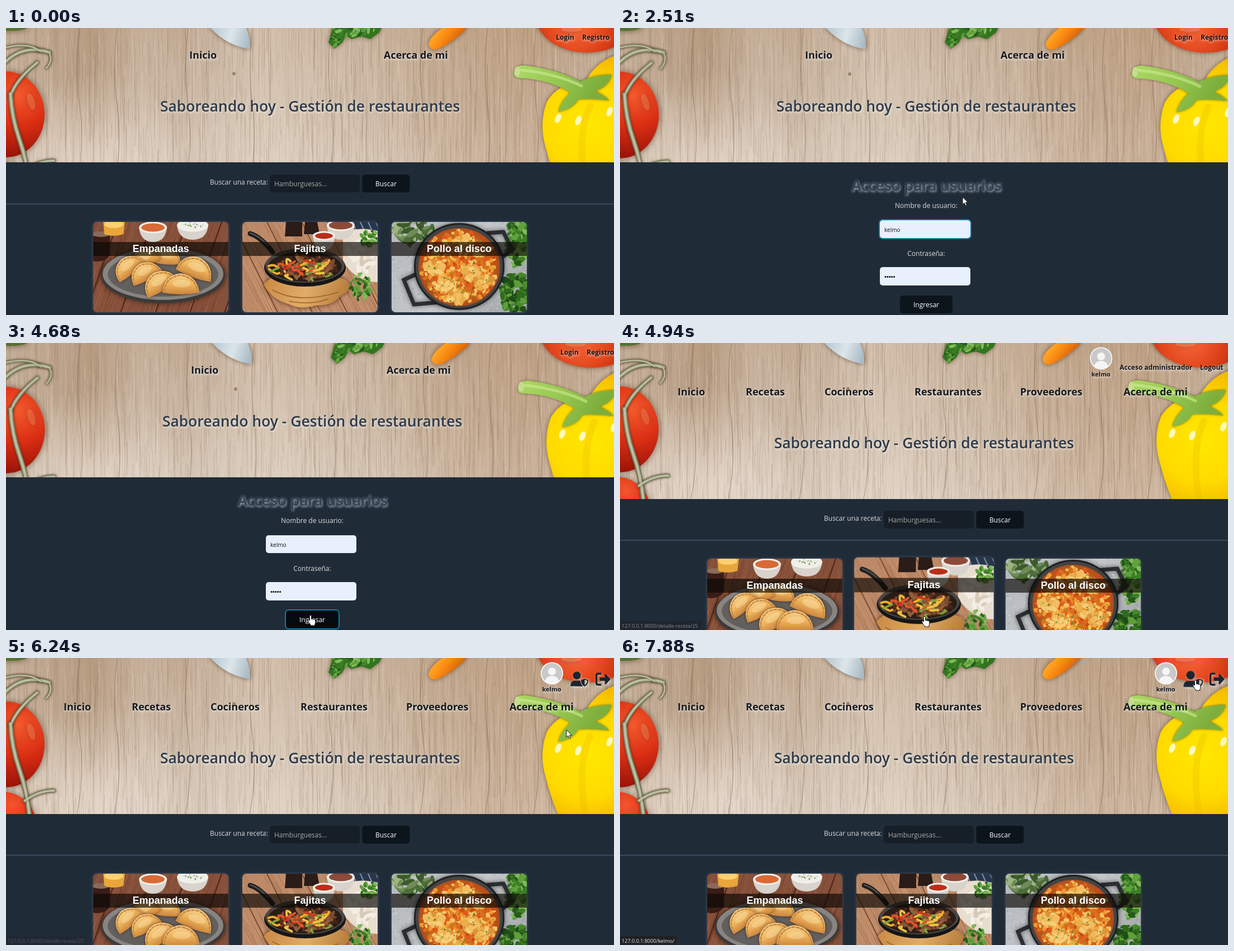
An HTML page with a canvas that plays this animation: 1088 by 515 pixels, repeating every 8000 ms.

```html
<!DOCTYPE html>
<html lang="es">
<head>
<meta charset="utf-8">
<title>Recetas</title>
<style>
html, body { margin: 0; width: 100%; height: 100%; overflow: hidden; background: #202b38; }
#stage { position: relative; width: 1088px; height: 515px; overflow: hidden; background: #202b38; }
#stage > * { position: absolute; left: 0; top: 0; }
#stage *, #ui * { animation-duration: 8s; animation-iteration-count: infinite; animation-timing-function: linear; }
#head { width: 1088px; overflow: hidden; animation-name: head; }
#wood { display: block; transform-origin: 0 0; animation-name: widen; }
#cards, #search { animation-name: home; }
#cards { --dy: 39px; }
#search { --dy: 38px; }
.card { position: absolute; top: 348px; width: 242px; height: 162px; border-radius: 7px; overflow: hidden; box-shadow: 0 0 5px #7f95ab66; }
.card canvas { display: block; }
.card b { position: absolute; left: 0; top: 36px; width: 100%; text-align: center; background: #0b0806a8; color: #fff;
  font: bold 18px/25px 'Liberation Sans', Arial, sans-serif; }
#mid { animation-name: zoom; }

text { font: 12px 'Open Sans', 'Noto Sans', sans-serif; fill: #dbdbdb; }
.c { text-anchor: middle; }
.dark text { fill: #15191f; font-weight: 700; filter: drop-shadow(1px 2px 2px #fffa); }
.dark .nav { font-size: 18px; }
.dark .h1 { font-size: 26.5px; font-weight: 600; fill: #2f3b49; text-anchor: middle; }
.dark .tiny { font-size: 11px; }
.h2 { font-size: 26.4px; font-weight: 600; fill: #30404f; text-anchor: middle; filter: drop-shadow(1px 2px 2px #b9c6d2); }
.field { font-size: 10px; fill: #111; }
#out { animation-name: out; }
#login { animation-name: login; }
#in { animation-name: in; }
#out, #login, #in, #head, #wood, #cards, #search, #links, #icons, #avatar, #arrow, #hand, #press { animation-timing-function: step-end !important; }
#links { animation-name: links; }
#icons { animation-name: icons; }
#avatar { animation-name: avatar; }
#shield { animation-name: grow; transform-box: fill-box; transform-origin: center; }
#press { animation-name: press; }
#send { animation-name: send; }
#ringA { animation-name: ringA; }
#ringB { animation-name: ringB; }
.status rect { fill: #202124; }
.status text { font-size: 9.1px; fill: #e4e5e8; }
#st1 { animation-name: st1; }
#st2 { animation-name: st2; }
#st3 { animation-name: st3; }
#ask { animation-name: ask; }
#ask .p { font-size: 9px; fill: #a4a7ac; }
#ask .btn { font-size: 9.2px; font-weight: 600; text-anchor: middle; }
#cursor { animation-name: move; }
#arrow { animation-name: arrow; }
#hand { animation-name: hand; }

@keyframes head { 0% { height: 241px } 59%, 100% { height: 280px } }
@keyframes widen { 0% { transform: none } 26.2% { transform: scale(1.0074) } 59%, 100% { transform: none } }
@keyframes home {
  0% { visibility: visible; transform: none }
  26.2% { visibility: hidden; transform: none }
  59%, 100% { visibility: visible; transform: translateY(var(--dy)) }
}
@keyframes out { 0% { visibility: visible } 26.2%, 100% { visibility: hidden } }
@keyframes login { 0% { visibility: hidden } 26.2% { visibility: visible } 59%, 100% { visibility: hidden } }
@keyframes in { 0% { visibility: hidden } 59%, 100% { visibility: visible } }
@keyframes links { 0% { opacity: 1 } 63.5%, 100% { opacity: 0 } }
@keyframes icons { 0% { opacity: 0 } 63.5%, 100% { opacity: 1 } }
@keyframes avatar { 0% { transform: translate(-116px) } 63.5%, 100% { transform: none } }
@keyframes grow { 0%, 94.5% { transform: none } 97%, 100% { transform: scale(1.1) } }
@keyframes zoom { 0%, 59.5% { transform: none } 63%, 72.8% { transform: scale(1.05) } 75.5%, 100% { transform: none } }
@keyframes press { 0% { transform: none } 48.4% { transform: translateY(2px) } 50%, 100% { transform: none } }
@keyframes send { 0%, 44% { fill: #0c151c } 45%, 100% { fill: #040a0f } }
@keyframes ringA { 0%, 48.4% { opacity: 1 } 49.4%, 100% { opacity: 0 } }
@keyframes ringB { 0%, 48.4% { opacity: 0 } 49.4%, 100% { opacity: 1 } }
@keyframes st1 { 0%, 18.6% { opacity: 0 } 20.6%, 26.2% { opacity: 1 } 28%, 100% { opacity: 0 } }
@keyframes st2 { 0%, 60.75% { opacity: 0 } 62.75%, 76.4% { opacity: 1 } 78.5%, 100% { opacity: 0 } }
@keyframes st3 { 0%, 95.2% { opacity: 0 } 97.2%, 100% { opacity: 1 } }
@keyframes ask { 0%, 66.2% { opacity: 0 } 68.1%, 72.5% { opacity: 1 } 74.2%, 100% { opacity: 0 } }
@keyframes arrow { 0% { opacity: 0 } 6.63% { opacity: 1 } 18% { opacity: 0 } 26.3% { opacity: 1 } 44% { opacity: 0 } 69% { opacity: 1 } 94%, 100% { opacity: 0 } }
@keyframes hand { 0% { opacity: 0 } 18% { opacity: 1 } 26.3% { opacity: 0 } 44% { opacity: 1 } 69% { opacity: 0 } 94%, 100% { opacity: 1 } }
@keyframes move {
  0%, 6.6% { transform: translate(1058px, 479px) }
  10% { transform: translate(1010px, 270px) }
  13% { transform: translate(982px, 90px) }
  15.4%, 17.9% { transform: translate(1000px, 30px) }
  19%, 26.5% { transform: translate(1006px, 18px) }
  31.4%, 33.9% { transform: translate(612px, 304px) }
  38% { transform: translate(560px, 385px) }
  43.2%, 44% { transform: translate(545px, 477px) }
  45%, 57.5% { transform: translate(545px, 488px) }
  61.7%, 66.1% { transform: translate(545px, 491px) }
  67.8% { transform: translate(697px, 430px) }
  70.5%, 72.7% { transform: translate(692px, 228px) }
  75.9% { transform: translate(990px, 150px) }
  80.5%, 81.9% { transform: translate(1018px, 104px) }
  85.5%, 86.5% { transform: translate(996px, 92px) }
  88.2%, 90.8% { transform: translate(988px, 84px) }
  95.5%, 100% { transform: translate(1030px, 40px) }
}
</style>
</head>
<body>
<div id="stage">
  <div id="head"><canvas id="wood" width="1088" height="280"></canvas></div>
  <div id="cards">
    <div class="card" style="left:156px"><canvas id="pies" width="242" height="162"></canvas><b>Empanadas</b></div>
    <div class="card" style="left:423px" id="mid"><canvas id="pan" width="242" height="162"></canvas><b>Fajitas</b></div>
    <div class="card" style="left:690px"><canvas id="stew" width="242" height="162"></canvas><b>Pollo al disco</b></div>
  </div>
  <svg id="ui" width="1088" height="515" viewBox="0 0 1088 515">
    <g id="search">
      <text x="365" y="281">Buscar una receta:</text>
      <rect x="472" y="263" width="161" height="32" rx="5" fill="#161f27"/>
      <text x="480" y="284" style="fill:#a9a9a9">Hamburguesas...</text>
      <rect x="637.5" y="263" width="85" height="32" rx="5" fill="#0c151c"/>
      <text x="680" y="284" class="c" style="fill:#fff">Buscar</text>
      <path d="M0 316H1088" stroke="#526980"/>
    </g>

    <g id="out" class="dark">
      <text x="984" y="21">Login</text><text x="1031" y="21">Registro</text>
      <text class="nav" x="328" y="55">Inicio</text><text class="nav" x="676" y="55">Acerca de mi</text>
      <text class="h1" x="544" y="150">Saboreando hoy - Gestión de restaurantes</text>
    </g>

    <g id="login">
      <g class="dark">
        <text x="992" y="21">Login</text><text x="1039" y="21">Registro</text>
        <text class="nav" x="331" y="55">Inicio</text><text class="nav" x="681" y="55">Acerca de mi</text>
        <text class="h1" x="548" y="150">Saboreando hoy - Gestión de restaurantes</text>
      </g>
      <text class="h2" x="548.5" y="292">Acceso para usuarios</text>
      <text class="c" x="548" y="323">Nombre de usuario:</text>
      <rect id="ringA" x="464" y="344" width="164" height="34" rx="6" fill="none" stroke="#0f7d9e" stroke-width="2"/>
      <rect x="465" y="345" width="162" height="32" rx="5" fill="#e8f0fe"/>
      <text class="field" x="473" y="366">kelmo</text>
      <text class="c" x="548" y="409">Contraseña:</text>
      <rect x="465" y="429" width="162" height="33" rx="5" fill="#e8f0fe"/>
      <path d="M475 446.5h17" stroke="#111" stroke-width="3.2" stroke-linecap="round" stroke-dasharray="0 3.9"/>
      <g id="press">
        <rect id="ringB" x="500" y="479" width="96" height="34" rx="6" fill="none" stroke="#0f7d9e" stroke-width="2"/>
        <rect id="send" x="501" y="480" width="94" height="32" rx="5"/>
        <text class="c" x="548" y="501" style="fill:#fff">Ingresar</text>
      </g>
    </g>

    <g id="in" class="dark">
      <g id="avatar">
        <clipPath id="disc"><circle cx="977" cy="27.5" r="19"/></clipPath>
        <circle cx="977" cy="27.5" r="20" fill="#fff"/>
        <circle cx="977" cy="27.5" r="18.5" fill="#c9c9c9"/>
        <g fill="#f5f5f5" clip-path="url(#disc)"><circle cx="977" cy="24" r="7"/><ellipse cx="977" cy="41" rx="12" ry="9"/></g>
        <text class="tiny c" x="976.5" y="60">kelmo</text>
      </g>
      <g id="links"><text x="894" y="48">Acceso administrador</text><text x="1038" y="48">Logout</text></g>
      <g id="icons" fill="#1b2530" style="filter:drop-shadow(1px 2px 2px #fff8)">
        <g id="shield">
          <circle cx="1021.5" cy="31.5" r="7"/>
          <path d="M1010 50.5q0-10 9-10h5q3 0 4.500 1q0 6 4 9.500z"/>
          <path d="M1035.500 36.500l7 2.600q.4 9-7 12.400q-7.400-3.400-7-12.400z" stroke="#d9c3ac"/>
          <path d="M1035.500 39v9.500q4.500-2.500 4.600-7.700z" fill="#d9c3ac"/>
        </g>
        <path d="M1064 28h-4q-3.500 0-3.500 3.500v13q0 3.500 3.500 3.500h4" fill="none" stroke="#1b2530" stroke-width="3.4" stroke-linecap="round"/>
        <path d="M1063 35h8.500v-5.500q.8-1.500 2-.5l7.500 8q.8 1 0 2l-7.500 8q-1.200 1-2-.5v-5.500h-8.500q-1.500-3 0-6z"/>
      </g>
      <text class="nav" x="103" y="94">Inicio</text><text class="nav" x="225" y="94">Recetas</text>
      <text class="nav" x="366" y="94">Cocineros</text><text class="nav" x="527" y="94">Restaurantes</text>
      <text class="nav" x="716" y="94">Proveedores</text><text class="nav" x="901" y="94">Acerca de mi</text>
      <text class="h1" x="544" y="189">Saboreando hoy - Gestión de restaurantes</text>
    </g>

    <g id="ask">
      <rect x="366" y="-8" width="364" height="263" rx="5" fill="#2b2c2f" style="filter:drop-shadow(0 1px 3px #0009)"/>
      <g fill="none" stroke="#4a4c50" stroke-width="1.5">
        <rect x="458" y="5" width="55" height="74" rx="5"/><rect x="473" y="0" width="26" height="10" rx="3"/>
        <rect x="494" y="35" width="54" height="20" rx="2"/><path d="M513 79h27v-24"/>
        <path d="M367 50q12-9 20 1t18 8t22 7t15-3M560 68q20-14 40-3t45-5" stroke-width="4"/>
      </g>
      <path d="M697 46a7 7 0 0 1 14 0z" fill="#55575b"/>
      <path d="M486 27l19 30h-38z" fill="#e98a7d" stroke="#e98a7d" stroke-width="2" stroke-linejoin="round"/>
      <path d="M486 38v9M486 51v2.500" stroke="#2b2c2f" stroke-width="2.6"/>
      <text x="505" y="55" style="font-size:18px;font-weight:700;fill:#8ab4f8">***</text>
      <path d="M541.500 39v11" stroke="#8ab4f8" stroke-width="1.5"/>
      <text x="402" y="47" style="font-size:27px;fill:#77797d">*</text>
      <text x="380" y="113" style="font-size:11.2px;fill:#e3e4e7">Comprobar las contraseñas guardadas</text>
      <text class="p" x="380" y="142">La contraseña que acabas de usar se ha visto expuesta en una brecha de</text>
      <text class="p" x="380" y="158">seguridad de datos. Para proteger tus cuentas, el gestor de contraseñas de</text>
      <text class="p" x="380" y="174">Velnor te recomienda que compruebes las contraseñas que tengas</text>
      <text class="p" x="380" y="190">guardadas.</text>
      <g fill="none" stroke="#a4a7ac" stroke-width="1.2"><circle cx="388.5" cy="229" r="5.4"/><path d="M388.500 228v4M388.500 225.500v1.300"/></g>
      <rect x="525.5" y="216.5" width="131" height="25" rx="3" fill="#8ab4f8" stroke="#6796e4" stroke-width="2"/>
      <rect x="527.5" y="218.5" width="127" height="21" rx="2" fill="none" stroke="#2b2c2f"/>
      <text class="btn" x="591" y="232" style="fill:#24324a">Comprobar contraseñas</text>
      <rect x="664.5" y="216.5" width="53" height="25" rx="3" fill="none" stroke="#3f4145"/>
      <text class="btn" x="690" y="232" style="fill:#8ab4f8">Cerrar</text>
    </g>

    <g class="status">
      <g id="st1"><rect y="499" width="97" height="16"/><text x="3" y="511">127.0.0.1:8000/login/</text></g>
      <g id="st2"><rect y="499" width="145" height="16"/><text x="3" y="511">127.0.0.1:8000/detalle-receta/25</text></g>
      <g id="st3"><rect y="499" width="102" height="16"/><text x="3" y="511">127.0.0.1:8000/kelmo/</text></g>
    </g>

    <g id="cursor" fill="#fff" stroke="#111" stroke-linejoin="round">
      <path id="arrow" d="M0 0V13.500L3.200 10.600L5.500 15.600L7.700 14.600L5.500 9.800H9.700Z"/>
      <path id="hand" d="M-1.700 9.500V1.400a1.600 1.600 0 0 1 3.200 0V7a1.500 1.500 0 0 1 2.700.4a1.400 1.400 0 0 1 2.400.5a1.300 1.300 0 0 1 2.100 1v4.200q0 2-1.200 3.400v1.700h-7.500v-1.500q-2-1.800-3.600-5.200t-1.800-3.100q1-1.400 3.700.1z"/>
    </g>
  </svg>
</div>
<script>
let g, seed = 7;
const rnd = (a = 0, b = 1) => {
  seed = (seed * 16807) % 2147483647;
  return a + (b - a) * seed / 2147483647;
};
const pick = list => list[Math.floor(rnd(0, list.length))];
const paint = (id, draw) => { g = document.getElementById(id).getContext('2d'); draw(); };

function oval(x, y, rx, ry, fill, rot = 0) {
  g.beginPath();
  g.ellipse(x, y, rx, ry, rot, 0, 7);
  g.fillStyle = fill;
  g.fill();
}
function shape(d, fill) {
  g.fillStyle = fill;
  g.fill(new Path2D(d));
}
function line(d, color, width) {
  g.strokeStyle = color;
  g.lineWidth = width;
  g.lineCap = 'round';
  g.stroke(new Path2D(d));
}
function stops(grad, colors) {
  colors.forEach((c, i) => grad.addColorStop(i / (colors.length - 1), c));
  return grad;
}
const glow = (x, y, r, ...colors) => stops(g.createRadialGradient(x, y, 0, x, y, r), colors);
const fade = (x0, y0, x1, y1, ...colors) => stops(g.createLinearGradient(x0, y0, x1, y1), colors);
function shade(blur, color = '#3a200c99') {
  g.shadowBlur = blur;
  g.shadowColor = color;
}
// Random ovals inside an ellipse: leaves, chunks of food
function bits(n, x, y, rx, ry, size, flat, colors) {
  for (let i = 0; i < n; i++) {
    const a = rnd(0, 6.28), r = Math.sqrt(rnd()), s = rnd(.5, 1) * size;
    oval(x + rx * r * Math.cos(a), y + ry * r * Math.sin(a), s, s * flat, pick(colors), rnd(0, 3));
  }
}
function grain(n, w, h, tilt, colors) {
  for (let i = 0; i < n; i++) {
    const x = rnd(-20, w), y = rnd(-40, h), len = rnd(20, 130), k = rnd(-3, 3);
    line(`M${x} ${y}q${k + tilt * len / 2} ${len / 2} ${tilt * len} ${len}`, pick(colors), rnd(.4, 1.4));
  }
}
const greens = ['#2f6a1d', '#47882a', '#1f4d18', '#5f9e3a'];
const fresh = ['#3d7f26', '#60a23c', '#27591c', '#84b95a'];

paint('wood', () => {
  g.fillStyle = fade(0, 0, 0, 280, '#c2ab94', '#cab7a3', '#d8c9ba');
  g.fillRect(0, 0, 1088, 280);
  g.fillStyle = fade(0, 0, 1088, 0, '#9d785500', '#9d785555', '#fff0', '#f6ece04d', '#f6ece020', '#b78d6633', '#b78d6655', '#b78d6600');
  g.fillRect(0, 0, 1088, 280);
  g.fillStyle = glow(150, 270, 190, '#f4ebe2aa', '#f4ebe200');
  g.fillRect(0, 0, 400, 280);
  grain(2600, 1088, 280, 0, ['#86674a28', '#7352372c', '#f4eae028', '#fff6ec2c', '#8d6f5330']);
  for (const x of [128, 195, 322, 437, 578, 742, 858, 945]) {
    line(`M${x + 4} 0q-9 70 0 140t-5 140`, '#6f4d3266', 1.2);
  }
  oval(408, 82, 3, 3, '#7a5a3c99');

  shade(12);
  oval(8, -3, 32, 8, '#55702f');
  oval(0, 155, 69, 77, glow(22, 120, 110, '#f25a2c', '#dc2f14', '#9c1408'));
  oval(-6, 306, 62, 66, glow(10, 265, 80, '#f4562d', '#de3218', '#b01a0c'));
  oval(45, 132, 6, 15, '#ff9a6a55', -.3);
  shade(4);
  for (const [color, w] of [['#878c6c', 9], ['#b9bea0', 5]]) {
    line('M-4 64Q30 28 78 44', color, w * .9);
    line('M78 46Q84 60 72 72', color, w * .5);
    line('M-4 36Q40 24 62 42', color, w * .5);
    line('M8 122Q18 92 56 62', color, w * .8);
    line('M8 118Q10 160 24 200T42 284', color, w);
    line('M34 256Q58 238 86 238', color, w * .8);
  }
  shade(9);
  shape('M362-4Q394 32 437 38Q438 18 428-4Z', fade(370, 0, 437, 20, '#b8c8d2', '#dce6ea', '#a9bac4'));
  shape('M586-4L577 26L588 37L602 26L609 13L618 20L636 15L652 20L668 8L674-4Z', '#32751f');
  shade(0);
  bits(60, 622, -2, 40, 16, 7, .4, fresh);
  bits(15, 591, 22, 9, 11, 5, .5, fresh);
  shade(9);
  shape('M786-4Q757 16 756 30Q760 42 774 37Q806 22 828-4Z', fade(765, 5, 800, 32, '#ffb02e', '#fb8b12', '#d9640a'));
  oval(1040, -22, 92, 66, glow(1020, -5, 100, '#f7683a', '#e2471d', '#bc2608'));
  oval(1012, 2, 18, 5, '#ff9d6d66');
  shape('M1100 46Q1055 58 1035 100Q990 96 968 132Q953 172 966 215Q976 255 992 290H1100Z',
    glow(1040, 175, 150, '#ffe800', '#ffdb00', '#efaa00'));
  shade(0);
  line('M1045 140Q1020 195 1038 290', '#e8ae0040', 12);
  for (const [x, y] of [[988, 162], [1024, 166], [1080, 150]]) oval(x, y, 5, 9, '#fffbd8dd', .4);
  shade(4);
  shape('M909 80Q911 66 928 67Q985 74 1028 96Q1050 84 1084 84Q1078 106 1054 113Q1070 120 1080 130Q1045 126 1024 128Q1014 146 988 150Q994 130 1010 116Q970 92 922 90Q908 90 909 80Z',
    fade(930, 70, 1040, 140, '#a9d563', '#95c650', '#7dae3c'));
  shade(0);
  line('M920 75Q985 82 1030 104', '#cfeb9499', 5);
  oval(915, 78, 5, 9, '#c6dc92');
});

function planks(base, seam, tilt, tones) {
  g.fillStyle = base;
  g.fillRect(0, 0, 242, 162);
  grain(320, 242, 162, tilt, tones);
  for (let x = -80; x < 300; x += 62) line(`M${x} 0l${tilt * 162} 162`, seam, 2);
}
function bowl(x, y, rx, fill) {
  shape(`M${x - rx} ${y}Q${x - rx + 3} ${y + 26} ${x} ${y + 26}T${x + rx} ${y}Z`, '#d8d3cc');
  oval(x, y, rx, rx * .42, '#f3efea');
  oval(x, y, rx - 4, rx * .42 - 3, fill);
}
function empanada(x, y, size, rot) {
  g.save();
  g.translate(x, y);
  g.rotate(rot);
  g.scale(size, size);
  shade(5, '#2008');
  shape('M-28 11Q-26-16 0-19Q26-16 30 11Q0 17-28 11Z', fade(0, -19, 0, 15, '#f8d592', '#edb45f', '#c98238'));
  shade(0);
  g.setLineDash([4, 3]);
  line('M-25 9Q-23-13 0-16Q23-13 27 9', '#c98a41', 2.5);
  g.setLineDash([]);
  oval(2, -3, 14, 6, '#fde6b066');
  g.restore();
}

paint('pies', () => {
  planks('#86503a', '#4a2416', -.35, ['#5f311f66', '#b3765666', '#6d392466', '#9a604688']);
  shape('M0 22H30V60Q20 74 0 70Z', '#3a1d18');
  oval(14, 22, 16, 5, '#8b6a5a');
  shape('M18 0H57L54 22Q36 28 20 22Z', '#e9a63a');
  oval(37, 4, 17, 7, '#ffd070');
  bowl(107, 10, 25, '#d96a35');
  bowl(178, 6, 28, '#efeee9');
  bits(18, 178, 5, 18, 5, 2, .6, ['#7c9a5a', '#c9c9b8']);
  shade(10, '#1009');
  oval(125, 96, 111, 50, '#3b3a39');
  shade(0);
  oval(125, 93, 108, 47, '#878481');
  oval(125, 94, 99, 40, '#625f5c');
  empanada(128, 62, 1, .1);
  empanada(92, 66, .95, -.4);
  empanada(62, 82, 1, -.7);
  empanada(92, 92, 1, -.5);
  empanada(182, 84, 1.15, .35);
  empanada(118, 110, 1.1, -.55);
  empanada(156, 114, 1.15, 0);
});

paint('pan', () => {
  planks('#bd8a68', '#7a4d34', .5, ['#8a573866', '#e0b08a77', '#9b664466', '#d09c7877']);
  shape('M150 0H242V24L205 14Z', '#28364d');
  for (let x = 155; x < 242; x += 14) line(`M${x} 0l8 18`, '#8192a8', 2);
  shape('M180 24Q200 6 242 16V108Q205 108 180 72Z', '#e8ded0');
  bits(18, 214, 54, 26, 34, 13, .4, ['#f5eee4', '#d9cab8']);
  shape('M78 0H107V26H76ZM112 0H134L138 22H110Z', '#2a1c18');
  bowl(176, 6, 25, '#8d4a37');
  bowl(146, 25, 20, '#b92f18');
  shade(8, '#200a');
  shape('M38 112Q58 88 112 92T186 104Q200 122 176 132Q164 150 132 150Q104 158 84 148Q50 138 38 112Z',
    fade(40, 95, 190, 150, '#c98943', '#e0ac68', '#b27636'));
  shade(0);
  line('M54 122Q100 148 172 126M84 142Q124 150 154 138', '#9c622a', 1.5);
  line('M14 21Q32 26 54 54', '#1c1c1d', 9);
  line('M14 20Q30 25 46 42', '#55524f', 2.5);
  oval(112, 82, 73, 34, '#161616');
  oval(112, 78, 71, 31, '#4a4745');
  oval(112, 80, 66, 27, '#2a1d16');
  bits(95, 112, 81, 54, 20, 9, .4, ['#7d4a30', '#5c301d', '#96603d', '#43241a']);
  for (let i = 0; i < 42; i++) {
    const a = rnd(0, 6.28), r = rnd(.2, 1);
    line(`M${112 + 55 * r * Math.cos(a)} ${81 + 20 * r * Math.sin(a)}q${rnd(-14, 14)} ${rnd(-10, 10)} ${rnd(-20, 20)} ${rnd(-8, 8)}`,
      pick(['#e8532a', '#f3ad2c', '#ecc443', '#7fa53a', '#8a5436', '#d0381f']), 4);
  }
  bits(32, 228, 30, 16, 14, 6, .6, fresh);
  bits(50, 212, 116, 19, 24, 6, .5, fresh);
});

paint('stew', () => {
  g.fillStyle = fade(0, 0, 242, 162, '#b4b8bc', '#c5c8cb', '#9da2a4');
  g.fillRect(0, 0, 242, 162);
  bits(500, 121, 81, 150, 100, 2, .7, ['#898e9266', '#e2e4e677']);
  bits(60, 28, 14, 44, 24, 14, .4, ['#6f8b56', '#4d6e3a', '#9db482', '#3d5a2c']);
  bits(130, 226, 34, 20, 44, 9, .55, fresh);
  bits(130, 222, 128, 28, 36, 9, .55, greens);
  shade(8, '#0008');
  line('M56 88L22 104L40 148L86 144M172 20L200 18L216 50L192 68', '#2b2e30', 7);
  oval(121, 80, 81, 78, '#1d1f20');
  shade(0);
  oval(121, 80, 78, 75, '#424445');
  oval(121, 81, 73, 70, glow(121, 80, 75, '#e98a2f', '#dd741f', '#a8481a'));
  bits(420, 121, 81, 68, 65, 6, .7, ['#df5a1d', '#f09a32', '#c94c15', '#f5b54c', '#d9701f', '#f7c565']);
  for (const [x, y] of [[96, 112], [144, 92], [130, 36], [165, 108], [76, 82], [118, 134]]) {
    bits(50, x, y, 17, 12, 7, .7, ['#f6ce77', '#e9ad4a', '#dc9538', '#f2bd60']);
  }
  bits(70, 121, 81, 66, 63, 2, .7, ['#4f8a28', '#77a83c', '#376d1c']);
});
</script>
</body>
</html>
```
